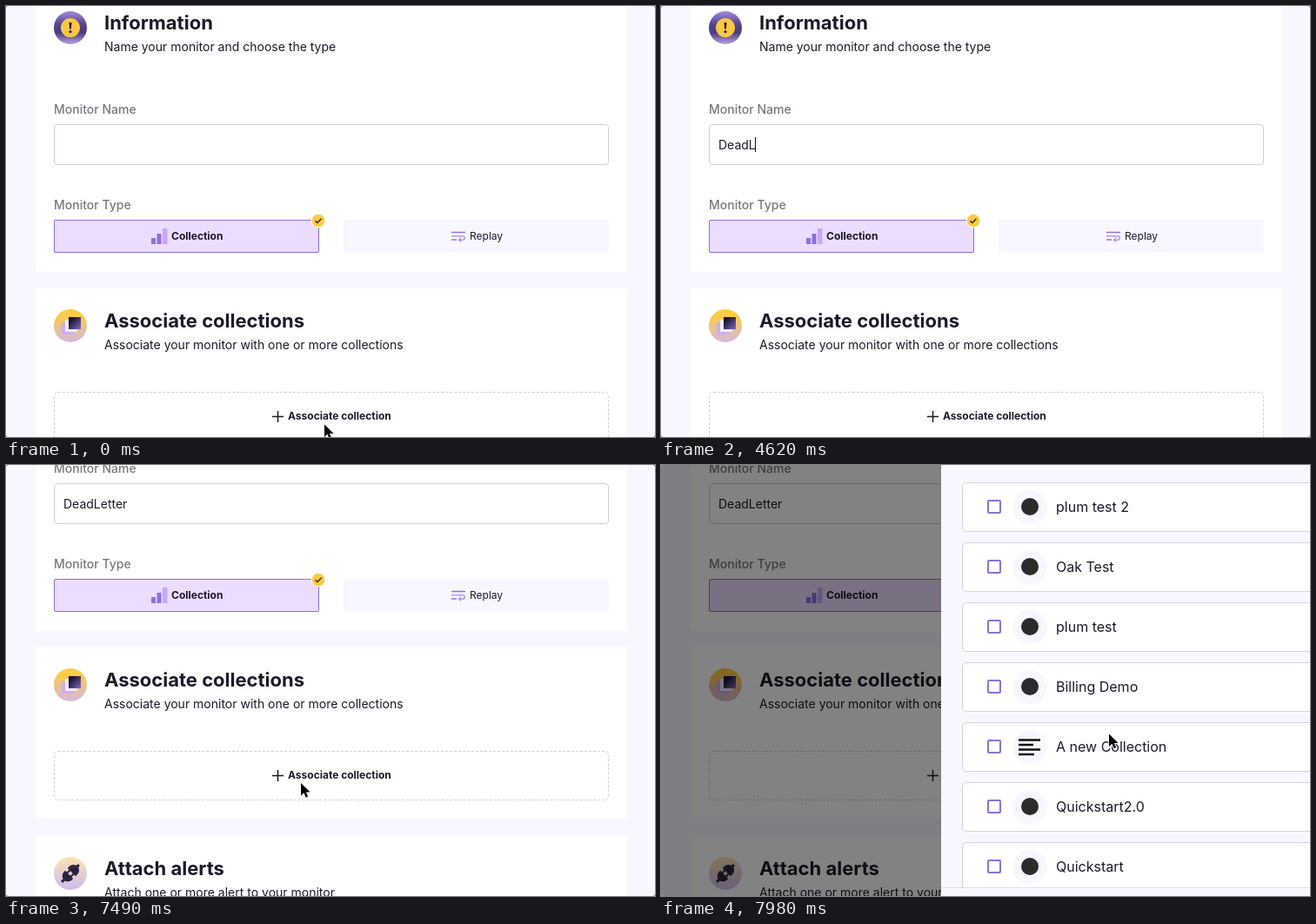
Animation, 746 px wide and 496 px high, one loop 8 s. Source, as an HTML page:

```html
<!DOCTYPE html>
<html lang="en">
<head>
<meta charset="utf-8">
<title>Create monitor</title>
<style>
  :root {
    --ink: #1b1a29;
    --violet: #8d74d3;
    --mist: #f8f7ff;
    --line: #cfcfd5;
  }
  html, body { margin: 0; width: 100%; height: 100%; overflow: hidden; background: #85858b; }
  * { box-sizing: border-box; }
  .stage {
    position: relative; width: 746px; height: 496px; overflow: hidden;
    border-radius: 3px; background: var(--mist); color: var(--ink);
    font: 14px/20px Inter, "Open Sans", sans-serif;
  }
  .stage * { position: absolute; white-space: pre; }
  svg { overflow: visible; }
  svg * { position: static; }

  /* one 8 s clock for everything; the steps follow a 70 ms beat */
  .page, .cover, .pointer, .arrow, .beam, .shade, .drawer, .mark {
    animation: 8s step-end -10ms infinite;
  }

  /* form */
  .page { inset: 0; animation-name: scroll; }
  .card { left: 34px; width: 680px; background: #fff; }
  .icon { left: 21px; top: 24px; width: 38px; height: 38px; }
  h2 { left: 79px; top: 27px; margin: 0; font-size: 22px; line-height: 20px; font-weight: 700; }
  .sub { left: 79px; top: 55px; }
  .label { left: 21px; color: #78777d; font-weight: 500; }
  .field {
    left: 21px; top: 154px; width: 638px; height: 47px;
    border: 1px solid var(--line); border-radius: 4px; background: #fff;
  }
  .field span { left: 10px; top: 13px; }
  .cover {
    left: 10px; top: 14px; width: 84px; height: 17px; background: #fff;
    border-left: 1px solid transparent; animation-name: type;
  }
  .choice { top: 264px; width: 305px; height: 38px; background: var(--mist); font-size: 12px; }
  .choice span { top: 9px; }
  .picked { background: #ecdcff; border: 1px solid #8a6fd6; border-radius: 2px; font-weight: 700; }
  .add {
    left: 21px; top: 119px; width: 638px; height: 57px;
    border: 1px dashed var(--line); border-radius: 5px;
    font-size: 12px; font-weight: 700;
  }
  .add span { left: 268px; top: 17px; }

  /* drawer */
  .shade { inset: 0; background: rgba(0, 0, 0, .49); opacity: 0; animation-name: fade; }
  .drawer {
    left: 322px; top: -60px; width: 576px; height: 700px; background: var(--mist);
    opacity: 0; transform-origin: 288px 350px; animation-name: fade, zoom;
  }
  .list { left: 0; top: 60px; width: 576px; height: 486px; overflow: hidden; }
  .foot { left: 0; top: 546px; width: 576px; height: 154px; border-top: 1px solid #dedde6; }
  .row {
    left: 24px; top: calc(20px + 69px * var(--i)); width: 528px; height: 57px;
    border: 1px solid #d5d4de; border-radius: 5px; background: #fff; font-size: 16px;
  }
  .row b { left: 28px; top: 19px; width: 16px; height: 16px; border: 2px solid var(--violet); border-radius: 2px; }
  .row i { left: 57px; top: 8px; width: 40px; height: 39px; border-radius: 50%; background: var(--mist); }
  .row span { left: 107px; top: 17px; }
  .mark { left: 67px; top: 17px; width: 20px; height: 20px; border-radius: 50%; background: #2b2b2b; animation-name: load; }
  .lines { border-radius: 0; left: 64px; top: 18px; width: 25px; background: none; }

  /* pointer */
  .pointer { left: 0; top: 0; width: 0; height: 0; animation-name: move; }
  .arrow { animation-name: arrow; }
  .beam { animation-name: beam; }

  @keyframes scroll {
    0%, 81.375% { transform: translateY(0); }
    81.375% { animation-timing-function: steps(3); }
    84% { transform: translateY(-44px); animation-timing-function: steps(4); }
    87.5% { transform: translateY(-108px); animation-timing-function: steps(2); }
    89.25%, 100% { transform: translateY(-115px); }
  }
  @keyframes type {
    0% { transform: translateX(0); border-color: transparent; }
    25.375% { transform: translateX(0); border-color: #111; }
    32.375% { transform: translateX(0); border-color: transparent; }
    33.25% { transform: translateX(10px); border-color: #111; }
    35.875% { transform: translateX(18px); border-color: #111; }
    37.625% { transform: translateX(26px); border-color: #111; }
    39.375% { transform: translateX(34px); border-color: #111; }
    45.5% { transform: translateX(34px); border-color: transparent; }
    52.5% { transform: translateX(34px); border-color: #111; }
    57.75% { transform: translateX(42px); border-color: #111; }
    61.25% { transform: translateX(50px); border-color: #111; }
    63% { transform: translateX(55px); border-color: #111; }
    65.625% { transform: translateX(61px); border-color: #111; }
    68.25% { transform: translateX(69px); border-color: #111; }
    69.125% { transform: translateX(74px); border-color: #111; }
    76.125% { transform: translateX(74px); border-color: transparent; }
    83.125% { transform: translateX(74px); border-color: #111; }
    89.25%, 100% { transform: translateX(74px); border-color: transparent; }
  }
  @keyframes move {
    0% { transform: translate(350px, 461px); animation-timing-function: steps(3); }
    2.625% { transform: translate(205px, 251px); }
    4.375% { transform: translate(205px, 251px); animation-timing-function: steps(7); }
    10.5% { transform: translate(192.5px, 172.5px); }
    14% { transform: translate(185.5px, 163px); }
    32.375% { transform: translate(184.5px, 160px); }
    78.75% { transform: translate(184.5px, 160px); animation-timing-function: steps(6); }
    84% { transform: translate(223.5px, 300px); animation-timing-function: steps(6); }
    89.25% { transform: translate(317px, 346px); }
    90.125% { transform: translate(323px, 345.5px); }
    94.5% { transform: translate(329px, 341px); animation-timing-function: steps(6); }
    99.75%, 100% { transform: translate(499px, 289px); }
  }
  @keyframes arrow {
    0% { opacity: 1; }
    9.625% { opacity: 0; }
    85.75%, 100% { opacity: 1; }
  }
  @keyframes beam {
    0% { opacity: 0; }
    9.625% { opacity: 1; }
    32.375% { opacity: 0; }
    77.875% { opacity: 1; }
    85.75%, 100% { opacity: 0; }
  }
  @keyframes fade {
    0% { opacity: 0; }
    94.5% { opacity: .57; }
    95.375% { opacity: .88; }
    96.25%, 100% { opacity: 1; }
  }
  @keyframes zoom {
    0% { transform: scale(.95); }
    94.5% { transform: scale(.9795); }
    95.375% { transform: scale(.994); }
    96.25%, 100% { transform: none; }
  }
  @keyframes load {
    0% { opacity: 0; }
    97.125%, 100% { opacity: 1; }
  }
</style>
</head>
<body>
<div class="stage">
  <div class="page">
    <section class="card" style="top:-18px;height:324px">
      <svg class="icon" viewBox="0 0 38 38">
        <defs><linearGradient id="dusk" x2="0" y2="1">
          <stop offset="0" stop-color="#a18bdc"/><stop offset=".4" stop-color="#55448c"/>
          <stop offset=".65" stop-color="#4b3b80"/><stop offset="1" stop-color="#b9a5e4"/>
        </linearGradient></defs>
        <circle cx="19" cy="19" r="19" fill="url(#dusk)"/>
        <circle cx="19" cy="19" r="11" fill="#fbc744"/>
        <path d="M17.5 13h3l-.6 7.500h-1.800z" fill="#1d1730"/>
        <circle cx="19" cy="23.500" r="1.500" fill="#1d1730"/>
      </svg>
      <h2>Information</h2>
      <div class="sub">Name your monitor and choose the type</div>
      <div class="label" style="top:127px">Monitor Name</div>
      <div class="field"><span>DeadLetter</span><div class="cover"></div></div>
      <div class="label" style="top:237px">Monitor Type</div>
      <div class="choice picked" style="left:21px">
        <svg width="19" height="18" style="left:111px;top:9px">
          <path d="M0 11h5v7H0zM6.500 6h5v12h-5z" fill="#8f6fe0"/>
          <path d="M13 0h5.500v18H13z" fill="#c6a8f7"/>
        </svg>
        <span style="left:134px;top:8px">Collection</span>
        <svg width="16" height="16" style="left:295px;top:-8px">
          <circle cx="8" cy="8" r="8.300" fill="#fff"/>
          <circle cx="8" cy="8" r="7.300" fill="#fcc93f"/>
          <path d="M4.500 8.200l2.400 2.300 4.600-4.800" fill="none" stroke="#2a2233" stroke-width="1.300"/>
        </svg>
      </div>
      <div class="choice" style="left:354px">
        <svg width="17" height="12" style="left:124px;top:13px" fill="none" stroke-width="1.500">
          <path d="M0 1.500h16M0 10h6" stroke="#8f6fe0"/>
          <path d="M0 5.800h13a2.200 2.200 0 0 1 0 4.400h-4M11 7.800l-2.400 2.400 2.400 2.300" stroke="#b596ee"/>
        </svg>
        <span style="left:145px">Replay</span>
      </div>
    </section>

    <section class="card" style="top:325px;height:197px">
      <svg class="icon" viewBox="0 0 38 38">
        <defs>
          <linearGradient id="dawn" x2="0" y2="1">
            <stop offset=".2" stop-color="#fdcb45"/><stop offset="1" stop-color="#d5b8e4"/>
          </linearGradient>
          <linearGradient id="night" x2="1" y2="1">
            <stop offset=".2" stop-color="#16122a"/><stop offset="1" stop-color="#8169bd"/>
          </linearGradient>
        </defs>
        <circle cx="19" cy="19" r="19" fill="url(#dawn)"/>
        <path d="M9 15h14v14H9z" fill="#c9aff0"/>
        <path d="M13 12h14v14H13z" fill="#f3eafc"/>
        <path d="M17 9h14v14H17z" fill="url(#night)"/>
      </svg>
      <h2>Associate collections</h2>
      <div class="sub">Associate your monitor with one or more collections</div>
      <div class="add">
        <svg width="13" height="13" style="left:250px;top:21px">
          <path d="M6.500 0v13M0 6.500h13" stroke="#1b1a29" stroke-width="1.500"/>
        </svg>
        <span>Associate collection</span>
      </div>
    </section>

    <section class="card" style="top:542px;height:197px">
      <svg class="icon" viewBox="0 0 38 38">
        <defs><linearGradient id="haze" x2="0" y2="1">
          <stop offset="0" stop-color="#fde3b0"/><stop offset="1" stop-color="#cdbbee"/>
        </linearGradient></defs>
        <circle cx="19" cy="19" r="19" fill="url(#haze)"/>
        <g transform="rotate(-45 19 19)" fill="#2a2340">
          <path d="M17 12.500v13h-2a6.500 6.500 0 0 1 0-13zM21 12.500h3a6.500 6.500 0 0 1 0 13h-3z"/>
          <path d="M5 17.500h5v3H5zM29 17.500h4v3h-4zM16 15h6v2h-6zM16 21h6v2h-6z"/>
        </g>
      </svg>
      <h2>Attach alerts</h2>
      <div class="sub">Attach one or more alert to your monitor</div>
    </section>
  </div>

  <div class="shade"></div>
  <div class="drawer">
    <div class="list">
      <div class="row" style="--i:0"><b></b><i></i><div class="mark"></div><span>plum test 2</span></div>
      <div class="row" style="--i:1"><b></b><i></i><div class="mark"></div><span>Oak Test</span></div>
      <div class="row" style="--i:2"><b></b><i></i><div class="mark"></div><span>plum test</span></div>
      <div class="row" style="--i:3"><b></b><i></i><div class="mark"></div><span>Billing Demo</span></div>
      <div class="row" style="--i:4"><b></b><i></i>
        <svg class="mark lines"><path d="M0 1.500h25M0 7h17M0 12.500h25M0 18h18" stroke="#111" stroke-width="2.400"/></svg>
        <span>A new Collection</span></div>
      <div class="row" style="--i:5"><b></b><i></i><div class="mark"></div><span>Quickstart2.0</span></div>
      <div class="row" style="--i:6"><b></b><i></i><div class="mark"></div><span>Quickstart</span></div>
    </div>
    <div class="foot"></div>
  </div>

  <div class="pointer">
    <svg class="arrow" width="12" height="18">
      <path d="M0 .5v14.500l3.400-3.200 2.300 5.400 2.500-1.100-2.300-5.200h4.700z" fill="#000" stroke="#fff" stroke-width="1.600" paint-order="stroke"/>
    </svg>
    <svg class="beam" width="9" height="17" style="left:-4.500px;top:-8.500px">
      <path d="M1 1q3.500 0 3.500 2.500v10q0 2.500-3.500 2.500M8 1q-3.500 0-3.500 2.500M4.500 13.500q0 2.500 3.500 2.500M3 8.500h3" fill="none" stroke="#111" stroke-width="1.200"/>
    </svg>
  </div>
</div>
</body>
</html>
```
